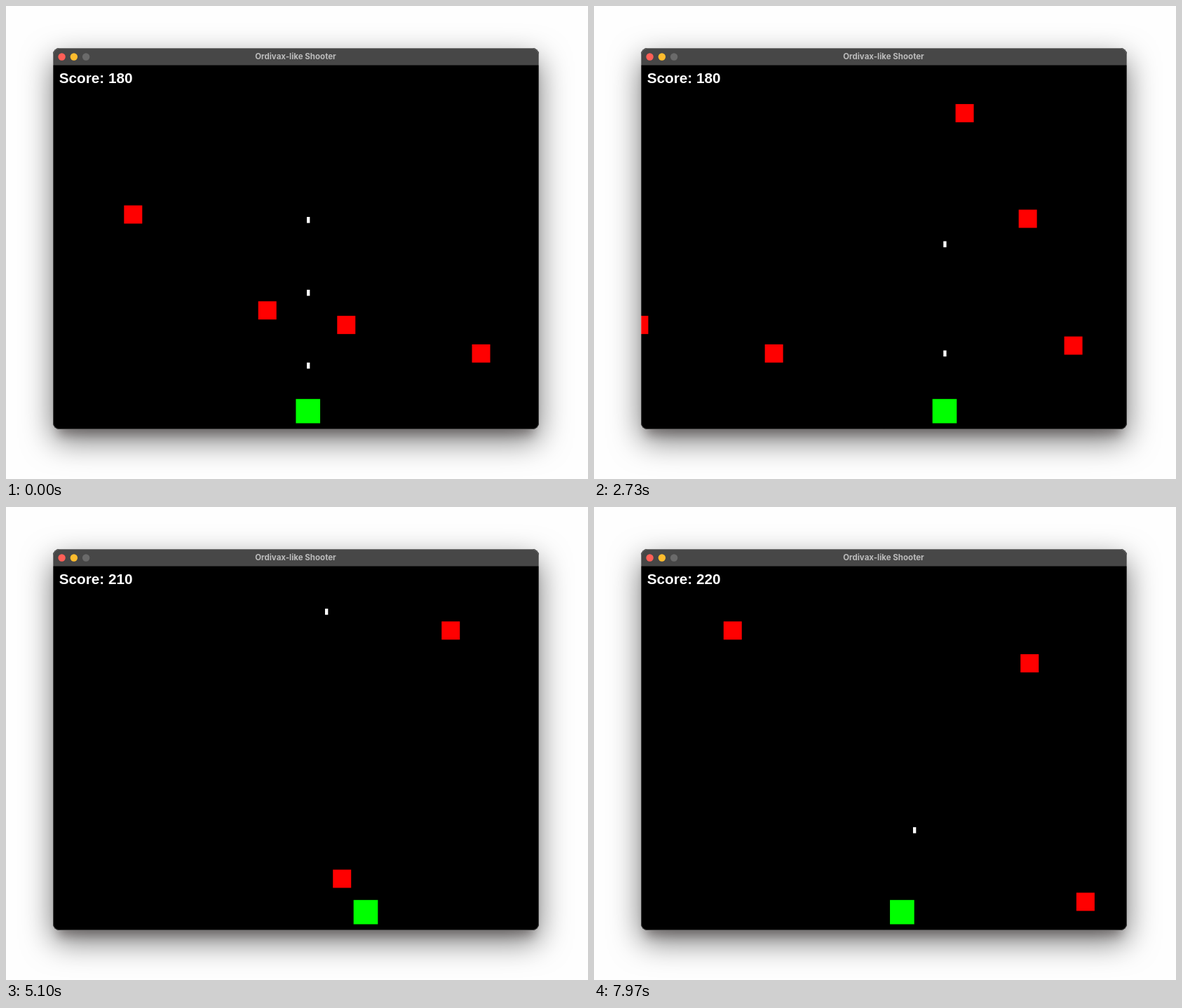
An HTML page with a canvas that plays this animation: 830x675 px, repeating every 8 s.

```html
<!DOCTYPE html>
<html lang="en">
<head>
<meta charset="utf-8">
<title>Shooter</title>
<style>
  html, body { margin: 0; width: 100%; height: 100%; overflow: hidden; background: #fefefe; }
  #shadow {
    position: absolute; left: 67px; top: 60px; width: 693px; height: 544px;
    border-radius: 9px; background: #000;
    box-shadow: 0 16px 14px -8px rgba(30, 15, 15, .28), 0 16px 44px rgba(0, 0, 0, .54);
  }
  canvas { position: absolute; left: 0; top: 0; display: block; }
</style>
</head>
<body>
<div id="shadow"></div>
<canvas id="stage" width="830" height="675"></canvas>
<script>
const ctx = document.getElementById('stage').getContext('2d');
const LOOP = 8000, FRAME = 1000 / 30, LAST_TICK = 471;
const WIN = { x: 67, y: 60, w: 693, h: 544, r: 9 };
const FIELD = { x: 67, y: 84.5, scale: 0.866 };
const SHIP = { x: 420, y: 550, size: 40, speed: 5 };
const SHOT = { w: 5, h: 10, speed: 10 };
const ENEMY_SIZE = 30;

// The recording drifts slightly against the game: [video frame, game tick]
const CLOCK = [[0, 0], [103, 203], [131, 260], [200, 396], [239, LAST_TICK]];

// Key presses: [tick, distance travelled]
const MOVES = [[6, 55], [63, 70], [121, -45], [166, -50],
  [290, 80], [380, -15], [436, -65], [467, -20]];

// Bursts of fire: [first tick, ticks between shots, number of shots]
const BURSTS = [[-29, 12, 3], [14, 12, 4], [72, 15, 2], [137, 18.3, 4],
  [206, 16.7, 4], [398, 12, 2], [460, 12, 1]];

// [left edge at tick 0, top, speed]
const enemies = [
  [117, 231, 2], [338, 389, 3], [468, 413, 3], [690, 460, 3],
  [842, 64, 2], [946, 238, 2], [1183, 447, 3], [1370, 500, 3],
  [1549, 91, 3], [1768, 395, 3], [1567, 145, 2], [1659, 538, 2]
].map(([x, y, speed]) => ({ x, y, speed, end: Infinity }));

const shots = BURSTS.flatMap(([first, gap, count]) =>
  Array.from({ length: count }, (_, i) => {
    const fired = Math.round(first + i * gap);
    return { fired, x: shipX(fired) - 2, end: Infinity };
  }));

function shipX(tick) {
  return MOVES.reduce((x, [start, distance]) => {
    const run = Math.max(0, tick - start) * SHIP.speed;
    return x + Math.sign(distance) * Math.min(Math.abs(distance), run);
  }, SHIP.x);
}

const enemyX = (e, tick) => e.x - e.speed * tick;
const shotY = (s, tick) => SHIP.y - SHOT.h - SHOT.speed * (tick - s.fired);
const inFlight = (s, tick) => tick >= s.fired && tick < s.end && shotY(s, tick) >= 0;

function overlaps(e, s, tick) {
  const dx = s.x - enemyX(e, tick), dy = shotY(s, tick) - e.y;
  return dx > -SHOT.w && dx < ENEMY_SIZE && dy > -SHOT.h && dy < ENEMY_SIZE;
}

// Play the game once to find out which shots hit
for (let tick = 0; tick <= LAST_TICK; tick++) {
  for (const s of shots) {
    if (!inFlight(s, tick)) continue;
    const target = enemies.find(e => tick < e.end && overlaps(e, s, tick));
    if (target) target.end = s.end = tick;
  }
}

function tickAt(frame) {
  const i = Math.max(1, CLOCK.findIndex(([f]) => frame <= f));
  const [f0, t0] = CLOCK[i - 1], [f1, t1] = CLOCK[i];
  return Math.round(t0 + (t1 - t0) * (frame - f0) / (f1 - f0));
}

function box(x, y, w, h, color) {
  const s = FIELD.scale;
  ctx.fillStyle = color;
  ctx.fillRect(FIELD.x + x * s, FIELD.y + y * s, w * s, h * s);
}

function windowPath(inset) {
  ctx.beginPath();
  ctx.roundRect(WIN.x + inset, WIN.y + inset, WIN.w - 2 * inset, WIN.h - 2 * inset, WIN.r - inset);
}

function label(text, x, y, font, color, align) {
  ctx.font = font;
  ctx.fillStyle = color;
  ctx.textAlign = align;
  ctx.fillText(text, x, y);
}

function drawTitleBar() {
  ctx.fillStyle = '#474747';
  ctx.fillRect(WIN.x, WIN.y, WIN.w, FIELD.y - WIN.y);
  ['#ff5f57', '#febc2e', '#6a6a6a'].forEach((color, i) => {
    ctx.fillStyle = color;
    ctx.beginPath();
    ctx.arc(79.6 + i * 17.25, 72.5, 5.2, 0, Math.PI * 2);
    ctx.fill();
  });
  label('Ordivax-like Shooter', 413, 76.3, 'bold 11.5px Inter, sans-serif', '#bcbcbc', 'center');
}

function drawGame(tick) {
  for (const e of enemies) {
    if (tick < e.end) box(enemyX(e, tick), e.y, ENEMY_SIZE, ENEMY_SIZE, '#f00');
  }
  for (const s of shots) {
    if (inFlight(s, tick)) box(s.x, shotY(s, tick), SHOT.w, SHOT.h, '#fff');
  }
  box(shipX(tick) - SHIP.size / 2, SHIP.y, SHIP.size, SHIP.size, '#0f0');
  const score = 180 + 10 * enemies.filter(e => tick >= e.end).length;
  label('Score: ' + score, 75.8, 110.4,
    'bold 20.7px "Liberation Sans", Arial, sans-serif', '#fff', 'left');
}

function draw(ms) {
  const frame = Math.floor((ms % LOOP + 3.4) / FRAME) % 240;
  ctx.clearRect(0, 0, 830, 675);
  ctx.save();
  windowPath(0);
  ctx.clip();
  ctx.fillStyle = '#000';
  ctx.fillRect(WIN.x, WIN.y, WIN.w, WIN.h);
  drawGame(tickAt(frame));
  drawTitleBar();
  ctx.restore();
  windowPath(0.5);
  ctx.lineWidth = 1;
  ctx.strokeStyle = 'rgba(255, 255, 255, .25)';
  ctx.stroke();
}

const start = performance.now();
function loop() {
  draw(performance.now() - start);
  requestAnimationFrame(loop);
}
loop();
</script>
</body>
</html>
```
